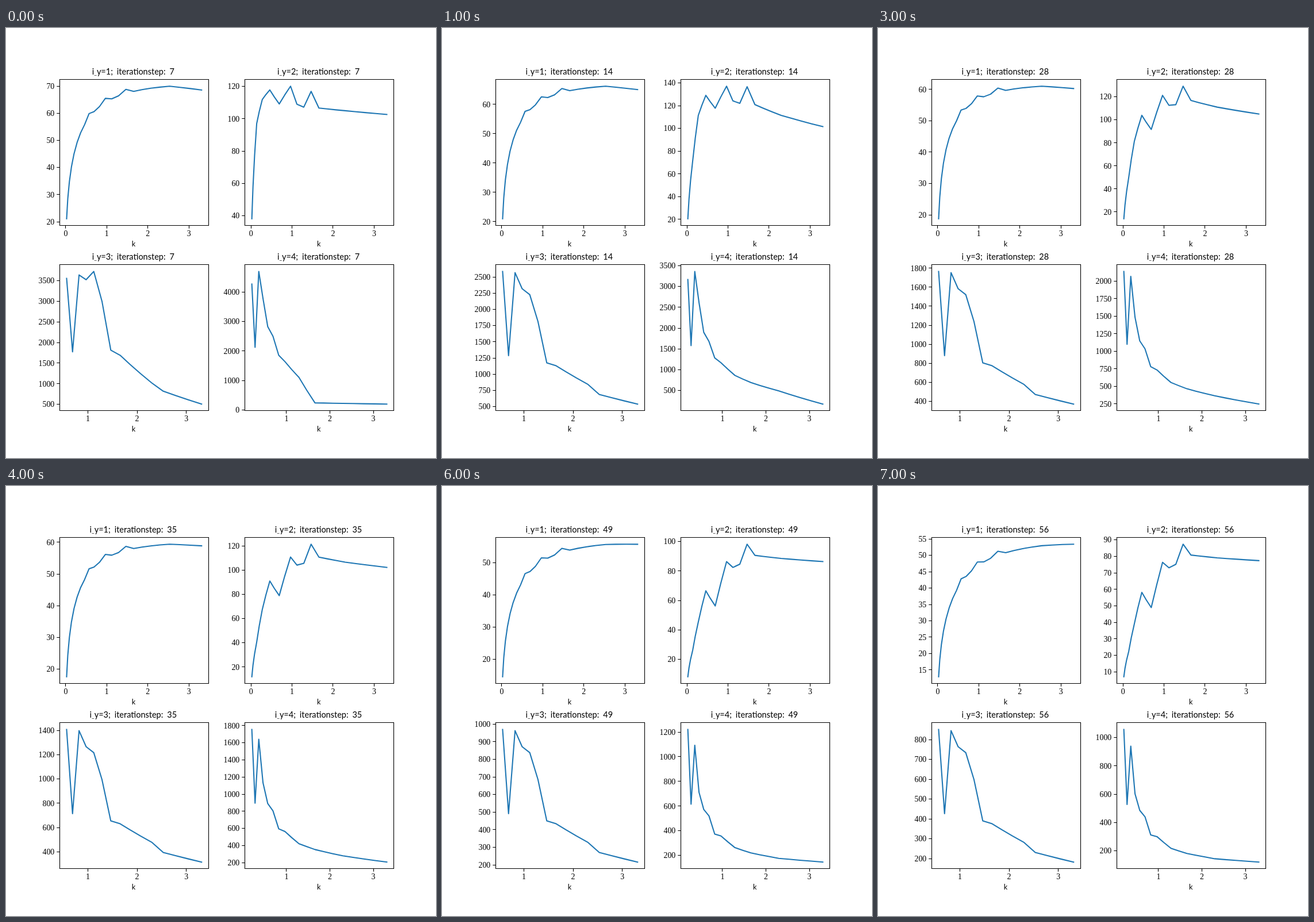
These frames come from a looping animation (748 by 748 pixels, 8000 ms). An HTML page:

```html
<!DOCTYPE html>
<html lang="en">
<head>
<meta charset="utf-8">
<title>Iteration steps</title>
<style>
html, body { margin: 0; width: 100%; height: 100%; overflow: hidden; background: #fff; }
svg { display: block; }
text { font-variant-ligatures: none; }
.title { font: 14.5px Lato, sans-serif; word-spacing: 3.2px; text-anchor: middle; }
.title tspan { font-size: 10px; }
.name { font: 12.7px Lato, sans-serif; text-anchor: middle; }
.tick { font: 13.9px "Liberation Serif", serif; }
.axis { fill: none; stroke: #000; stroke-width: 1.11; }
.curve { fill: none; stroke: #1f77b4; stroke-width: 2.08; stroke-linejoin: round; stroke-linecap: square; }
</style>
</head>
<body>
<svg id="stage" width="748" height="748" viewBox="0 0 748 748"></svg>
<script>
const HOLD = 1000, STEPS = 8, LAST = 22, W = 258.3, H = 253.7;
const KEYS = [0, 1, 2, 4, 6, 7];

const mix = (a, b, w) => a + (b - a) * w;
const snap = v => Math.floor(v) + 0.5;

// Piecewise linear through the points (xs, ys).
function along(xs, ys, x) {
  let j = 1;
  while (j < xs.length - 1 && xs[j] < x) j++;
  return mix(ys[j - 1], ys[j], (x - xs[j - 1]) / (xs[j] - xs[j - 1]));
}

// A range end decays exponentially from key to key.
const level = (keys, s) => Math.exp(along(KEYS, keys.map(Math.log), s));

// Saturating rise with a kink at every third sample and a late sag.
function rise(i, s) {
  const rate = 0.155 + 0.0125 * s - 0.0023 * s * s;
  const kink = i % 3 === 2 && i > 7 && i < 15 ? 0.03 : 0;
  const sag = 0.014 * (1 - s / 9) * Math.max(0, i - 19);
  return 1.015 * (1 - Math.exp(-rate * i - 0.0018 * i * i)) + kink - sag;
}

// Each knot holds a sample index and its height in the first, early and late pose.
function posed(knots) {
  const xs = knots.map(k => k[0]);
  return (i, s) => {
    const w = 1 - ((7 - s) / 6) ** 1.8;
    const ys = knots.map(([, first, early, late = early]) => s ? mix(early, late, w) : first);
    return along(xs, ys, i);
  };
}

const peaks = posed([
  [0, 0, 0, 0], [3, .718, .437, .19], [5, .9, .78, .398], [7, .972, .931, .637],
  [9, .866, .834, .522], [11, 1, 1, .863], [12, .864, .889, .822], [13, .842, .871, .848],
  [14, .961, .996, 1], [15, .835, .861, .918], [18, .815, .78, .897], [22, .787, .695, .876]
]);
const slope = posed([
  [8, .948, 1], [9, .394, .365], [10, .974, .991], [11, .938, .87], [12, 1, .825], [13, .775, .622],
  [14, .407, .311], [15, .368, .289], [18, .16, .15], [19, .097, .072], [22, 0, 0]
]);
const decay = posed([
  [4, .905, .939, 1], [5, .428, .441, .435], [6, 1, 1, .874], [7, .796, .766, .515],
  [8, .584, .541, .39], [9, .511, .472, .342], [10, .368, .348, .205], [11, .32, .312, .192],
  [13, .201, .216, .104], [15, .009, .162, .065], [18, .005, .099, .025], [22, 0, 0, 0]
]);

const panels = [
  { shape: rise, from: 0, lo: [21.1, 21, 20, 17.6, 14.5, 12.9], hi: [70, 66.2, 62.7, 59.4, 55.7, 53.4] },
  { shape: peaks, from: 0, lo: [38, 20.5, 16.6, 11.9, 8.1, 7], hi: [120.2, 137.2, 137.6, 121.4, 98.2, 87.4] },
  { shape: slope, from: 8, lo: [507, 540, 434, 317, 216, 182.5], hi: [3722, 2584, 2215, 1407, 970, 851] },
  { shape: decay, from: 4, lo: [204, 176, 295, 207, 146.5, 121], hi: [4690, 3362, 2605, 1756, 1221, 1057] }
];

const wave = i => (0.145 + 0.0761 * i) ** 2;

function padded(lo, hi) {
  const pad = (hi - lo) * 0.05;
  return [lo - pad, hi + pad];
}

function ticks([lo, hi], bins) {
  const raw = (hi - lo) / bins, unit = 10 ** Math.floor(Math.log10(raw));
  const step = unit * [1, 2, 2.5, 5, 10].find(m => m * unit >= raw);
  const list = [];
  for (let v = Math.ceil(lo / step) * step; v <= hi; v += step) list.push(v);
  return list;
}

const text = (cls, x, y, str, anchor) =>
  `<text class="${cls}" x="${x}" y="${y}"${anchor ? ` text-anchor="${anchor}"` : ""}>${str}</text>`;

function drawPanel({ shape, from, lo, hi }, n, s) {
  const left = n % 2 ? 415.9 : 93.7, top = n < 2 ? 89.7 : 412, bottom = top + H;
  const low = level(lo, s), high = level(hi, s);
  const xl = padded(wave(from), wave(LAST)), yl = padded(low, high);
  const px = k => left + (k - xl[0]) / (xl[1] - xl[0]) * W;
  const py = v => bottom - (v - yl[0]) / (yl[1] - yl[0]) * H;

  const heights = [];
  for (let i = from; i <= LAST; i++) heights.push(shape(i, s));
  const peak = Math.max(...heights);
  const points = heights.map((h, j) =>
    px(wave(from + j)).toFixed(2) + "," + py(mix(low, high, h / peak)).toFixed(2)).join(" ");

  const x0 = snap(left), x1 = snap(left + W), y0 = n < 2 ? 89.5 : 411.5, y1 = y0 + 254;
  let axis = `M${x0} ${y0}H${x1}V${y1}H${x0}Z`, labels = "";
  for (const k of ticks(xl, 6)) {
    axis += `M${snap(px(k))} ${y1}v5.2`;
    labels += text("tick", px(k).toFixed(2), y1 + 18.7, k, "middle");
  }
  for (const v of ticks(yl, 9)) {
    axis += `M${x0} ${snap(py(v))}h-5.2`;
    labels += text("tick", x0 - 9.2, (py(v) + 4.7).toFixed(2), v, "end");
  }
  const mid = left + W / 2;
  return `<polyline class="curve" points="${points}"/><path class="axis" d="${axis}"/>` + labels +
    text("title", mid - 1.5, y0 - 8.5, `i<tspan>_</tspan>y=${n + 1}; iterationstep: ${7 * (s + 1)}`) +
    text("name", mid - 0.8, y1 + 36, "k");
}

const stage = document.getElementById("stage");
let shown = -1;

function render(time) {
  const step = Math.floor(time / HOLD) % STEPS;
  if (step === shown) return;
  shown = step;
  stage.innerHTML = panels.map((p, n) => drawPanel(p, n, step)).join("");
}

const start = performance.now();
function loop() {
  render(performance.now() - start);
  requestAnimationFrame(loop);
}
loop();
</script>
</body>
</html>
```
